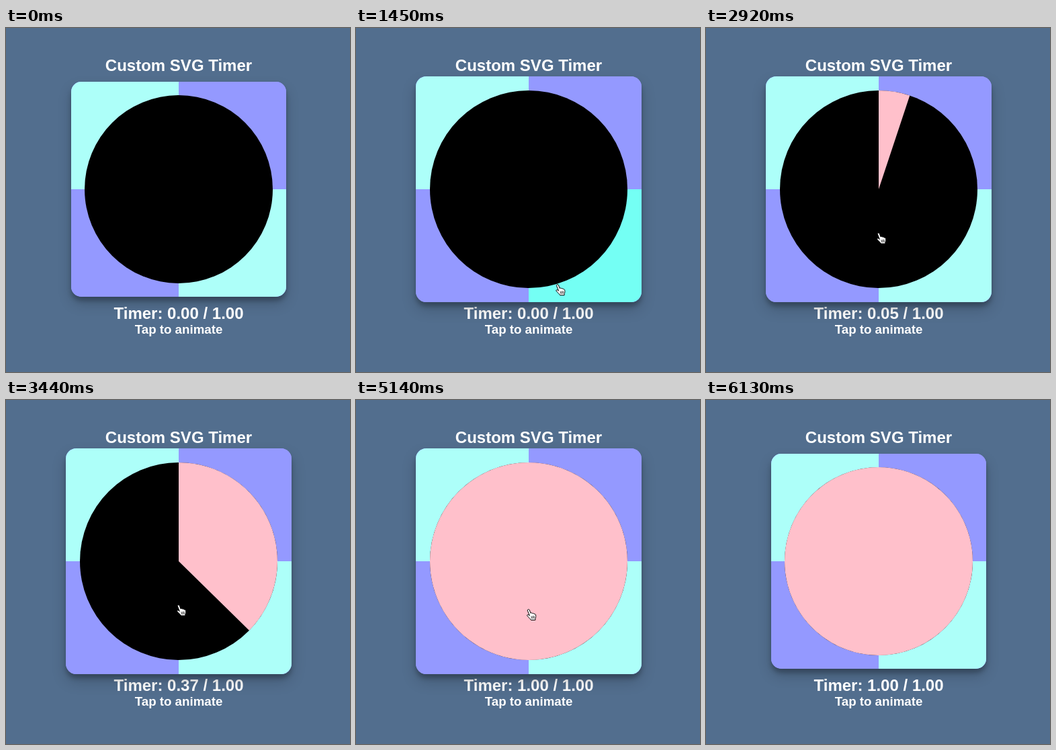
These frames come from a looping animation (512x512 px, 6.64 s). An HTML page:

```html
<!DOCTYPE html>
<html lang="en">
<head>
<meta charset="utf-8">
<title>Custom SVG Timer</title>
<style>
  html, body { margin: 0; width: 100%; height: 100%; overflow: hidden; background: #526e8e; }
  svg { display: block; }
  .layer { position: absolute; left: 0; top: 0; }
  #card {
    position: absolute; left: 97px; top: 80px; z-index: 1;
    border-radius: 15px; background: #9499ff; overflow: hidden;
    box-shadow: 0 10px 20px rgba(0, 0, 0, .19), 0 6px 6px rgba(0, 0, 0, .23);
  }
  #labels { font: bold 24px "Liberation Sans", Arial, sans-serif; }
  #pointer { z-index: 3; }
</style>
</head>
<body>
<svg id="labels" class="layer" width="512" height="512" fill="#fff" text-anchor="middle">
  <text x="257" y="64">Custom SVG Timer</text>
  <text id="count" x="257" y="433">Timer: 0.00 / 1.00</text>
  <text x="257" y="455" font-size="18.72">Tap to animate</text>
</svg>

<svg id="card" width="320" height="320">
  <rect id="base" width="320" height="320"/>
  <rect id="topLeft" width="160" height="160"/>
  <rect id="lowRight" x="160" y="160" width="160" height="160"/>
  <circle cx="160" cy="160" r="140"/>
  <path id="pie" fill="#ffc0cb"/>
</svg>

<svg id="pointer" class="layer" width="512" height="512">
  <g id="hand" stroke="#000" stroke-linejoin="round" stroke-linecap="round">
    <path fill="#fff" d="M-1.7 1.3C-1.5 -.2 .7 -.5 1.3 1.2L2.9 5.7C4 4.9 5.2 5.3 5.7 6.2
      C6.8 5.6 7.8 6.1 8.2 7.1C9.4 6.6 10.3 7.4 10.5 8.5C10.9 10.5 10.7 12 9.9 13.6
      L9.9 16H3.4C2.6 13.8 -.6 12 -2.3 9.4C-2.6 7.6 -.5 7.6 1.1 9.2Z"/>
    <path fill="none" stroke-width=".8" d="M4.1 10.6L4.7 13.8M6.1 10.3L6.6 13.6M8 10L8.4 13.3"/>
  </g>
</svg>

<script>
const LOOP = 6640, STEP = 58.15;
const STARTS = [570, 1450, 2920, 5140];
const CYAN = '#adfff9', CYAN_HOT = '#74fff4';
const PURPLE = '#9499ff', PURPLE_HOT = '#6b6fb5';

// Pointer path: time, x, y
const PATH = [
  [570, 300, 508], [880, 306, 400], [980, 309, 385.5], [1210, 318, 380],
  [1400, 318, 380], [1741, 196.5, 391.5], [1900, 190, 396], [2080, 205, 389],
  [2140, 215, 378], [2320, 257, 305], [5085, 257, 305], [5140, 257, 311.5],
  [5330, 290, 370], [5450, 325, 412], [5780, 404, 475.5], [6075, 458, 507]
];

const $ = id => document.getElementById(id);
const [labels, count, card, base, topLeft, lowRight, pie, hand] =
  ['labels', 'count', 'card', 'base', 'topLeft', 'lowRight', 'pie', 'hand'].map($);
const clamp = v => Math.max(0, Math.min(1, v));
const easeOut = u => 1 - (1 - clamp(u)) ** 2;

// Motion advances in even ticks within each burst of activity
function tick(t) {
  const start = STARTS.filter(s => s <= t).pop();
  return start === undefined ? t : start + Math.floor((t - start + 8) / STEP) * STEP;
}

function pointerAt(t) {
  if (t < 570 || t > 6100) return null;
  const i = PATH.findIndex(k => k[0] >= t);
  if (i < 0) return PATH[PATH.length - 1].slice(1);
  if (i === 0) return PATH[0].slice(1);
  const [t0, x0, y0] = PATH[i - 1], [t1, x1, y1] = PATH[i];
  const u = (t - t0) / (t1 - t0);
  return [x0 + (x1 - x0) * u, y0 + (y1 - y0) * u];
}

function hoverZone(pos, scale) {
  if (!pos) return '';
  const x = (pos[0] - 257) / scale, y = (pos[1] - 240) / scale;
  if (Math.max(Math.abs(x), Math.abs(y)) > 160 || Math.hypot(x, y) < 140) return '';
  if (x * y < 0) return 'base';
  return x > 0 ? 'lowRight' : 'topLeft';
}

function sector(p) {
  if (p <= 0) return '';
  const a = Math.min(p, .99999) * 2 * Math.PI;
  const x = 160 + 140 * Math.sin(a), y = 160 - 140 * Math.cos(a);
  return `M160 160V20A140 140 0 ${p > .5 ? 1 : 0} 1 ${x.toFixed(4)} ${y.toFixed(4)}Z`;
}

function draw(time) {
  const t = tick(time);
  const scale = 1 + .05 * (easeOut((t - 880) / 300) - easeOut((t - 5420) / 300));
  const raised = scale > 1.0001;
  card.style.transform = raised ? `scale(${scale})` : 'none';
  labels.style.zIndex = raised ? 0 : 2;

  const pos = pointerAt(t);
  hand.style.display = pos ? '' : 'none';
  if (pos) hand.setAttribute('transform', `translate(${pos[0]} ${pos[1]})`);

  const zone = hoverZone(pos, scale);
  base.setAttribute('fill', zone === 'base' ? PURPLE_HOT : PURPLE);
  topLeft.setAttribute('fill', zone === 'topLeft' ? CYAN_HOT : CYAN);
  lowRight.setAttribute('fill', zone === 'lowRight' ? CYAN_HOT : CYAN);

  const p = t < 2920 ? 0 : clamp(.051 + (t - 2920) * .000616);
  pie.setAttribute('d', sector(p));
  count.textContent = `Timer: ${p.toFixed(2)} / 1.00`;
}

const origin = performance.now();
function frame() {
  draw((performance.now() - origin) % LOOP);
  requestAnimationFrame(frame);
}
frame();
</script>
</body>
</html>
```
